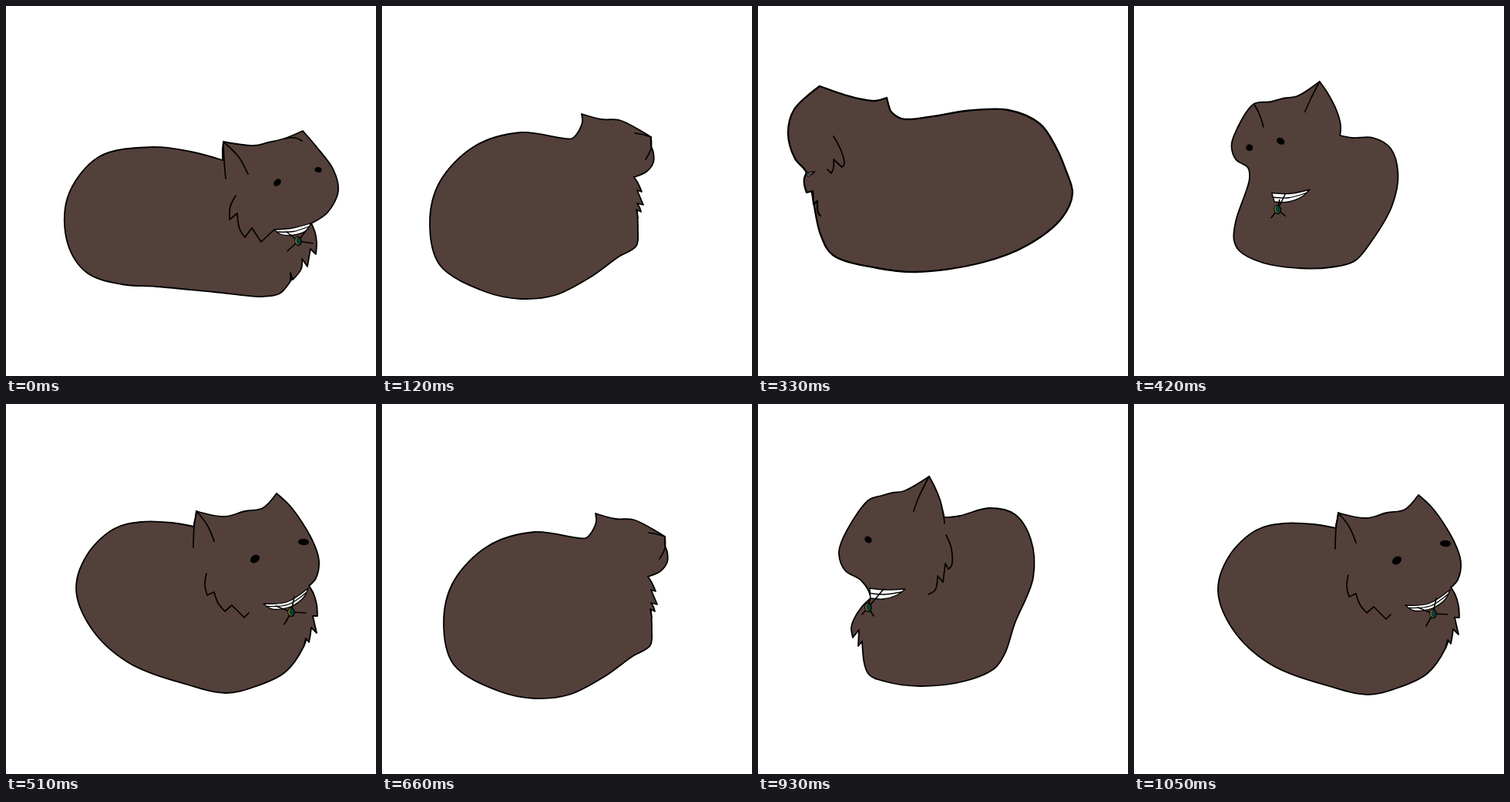
Write an HTML page with a canvas that moves like this. It is 480 by 480 pixels and loops after 1.08 s.

```html
<!DOCTYPE html>
<html lang="en">
<head>
<meta charset="utf-8">
<title>Turning cat</title>
<style>
  html, body { margin: 0; width: 100%; height: 100%; overflow: hidden; background: #fff; }
  canvas { display: block; }
</style>
</head>
<body>
<canvas id="stage" width="480" height="480"></canvas>
<script>
const ctx = document.getElementById("stage").getContext("2d");
const FUR = "#54403a", STEP = 30, POSES = 18;

const parse = s => s.split(" ").map(p => p.split(",").map(Number));
const shift = (pts, dx, dy) => pts.map(([x, y]) => [x + dx, y + dy]);
const mid = (a, b) => [(a[0] + b[0]) / 2, (a[1] + b[1]) / 2];

// A track holds point lists at some poses and the pose ranges in which it shows.
function track(ranges, keys) {
  const list = Object.entries(keys).map(([pose, pts]) =>
    [+pose, typeof pts === "string" ? parse(pts) : pts]);
  return pose => {
    if (!ranges.some(([a, b]) => pose >= a && pose <= b)) return null;
    const next = list.findIndex(k => k[0] >= pose);
    const [p1, b] = list[next];
    if (p1 === pose || next === 0) return b;
    const [p0, a] = list[next - 1], k = (pose - p0) / (p1 - p0);
    return a.map((pt, i) => pt.map((v, j) => v + (b[i][j] - v) * k));
  };
}

// Head clockwise from the left neck, then the body from the right neck.
const outline = track([[0, 17]], {
  0: "281,200 281,195 281,190 281,185 282,176 322,181 340,177 361,172 385,162 403,183 425,213 431,240 417,268 396,282 " +
     "398,300 385,328 369,357 355,373 333,377 270,371 195,364 150,361 105,346 80,308 80,248 120,196 190,183 240,189",
  4: "246,172 252,167 257,159 260,150 259,140 285,147 308,148 336,162 349,170 349,181 352,190 352,203 343,215 327,222 " +
     "330,245 331,265 332,290 330,311 306,326 270,352 225,375 180,380 135,371 75,336 62,280 75,228 120,182 180,164",
  11: "63,216 48,198 39,165 47,134 80,104 115,116 135,121 152,123 167,119 169,127 172,136 178,142 186,146 197,147 " +
      "235,142 270,136 325,135 366,153 387,184 399,212 408,243 395,274 350,310 290,333 205,345 155,340 97,323 81,296",
  13: "116,227 95,214 87,193 91,175 125,123 142,117 157,113 171,111 204,92 211,105 218,122 222,138 223,144 225,145 " +
      "244,143 282,133 315,141 336,174 339,223 315,283 303,320 290,340 252,357 192,364 147,358 126,349 118,320 128,248",
  17: "244,159 244,155 245,151 246,147 247,139 283,146 310,139 333,135 351,116 370,134 397,176 406,203 402,226 393,236 " +
      "401,255 395,285 386,315 362,348 322,367 285,375 235,364 158,335 110,290 91,240 105,196 140,162 175,153 215,154"
});

const chestRight = track([[0, 4], [17, 17]], {
  0: "396,282 401,294 403,307 402,322 395,315 391,338 384,328 383,341 372,355 369,346 369,357",
  4: "327,222 331,228 334,234 337,241 331,239 339,258 331,256 334,261 336,267 330,264 332,275",
  17: "393,236 399,246 403,260 404,275 398,275 403,297 396,290 395,298 393,309 389,304 386,315"
});
const chestLeft = track([[11, 13]], {
  11: "63,216 60,224 60,231 63,242 71,240 72,257 77,253 78,268 81,272",
  13: "128,250 116,262 106,278 103,288 105,301 113,291 112,312 117,306 118,320"
});

const cheekFront = parse("298,246 291,260 290,277 300,269 303,289 310,300 319,288 331,306 347,291");
const cheekTurned = parse("260,220 258,234 261,248 270,244 275,258 284,269 293,261 309,277 315,271");
const lines = [
  // cheeks
  track([[0, 2], [15, 17]], {
    0: cheekFront, 4: shift(cheekFront, 0, -40),
    13: shift(cheekTurned, -130, -5), 17: cheekTurned
  }),
  track([[11, 13]], {
    11: "98,169 108,188 112,205 109,209 98,199 98,210 95,217 92,214 90,212",
    13: "226,168 233,186 233,208 229,212 225,205 222,229 215,221 212,239 203,245"
  }),
  // ears
  track([[0, 2], [14, 17]], {
    0: "283,177 302,196 314,218", 4: "260,140 262,150 264,160",
    13: "125,123 130,135 134,150", 17: "247,139 261,157 270,178"
  }),
  track([[0, 3], [15, 17]], {
    0: "282,176 283,200 285,224", 4: "259,140 259,155 250,170",
    13: "125,123 122,135 120,150", 17: "247,139 244,160 243,186"
  }),
  track([[12, 15]], {
    11: "167,119 160,130 150,140", 13: "204,92 190,120 184,137", 17: "351,116 345,126 335,138"
  }),
  track([[12, 13]], { 11: "172,136 174,139 178,142", 13: "222,138 223,144 224,153" }),
  track([[0, 4]], { 0: "361,172 375,171 384,175", 4: "328,165 339,167 349,170" }),
  track([[4, 4]], { 4: "349,170 349,185 342,199" })
];

const scarf = track([[0, 2], [11, 17]], {
  0: "348,290 372,288 395,282 391,290 374,297 356,296",
  4: "322,222 325,223 328,222 328,224 326,225 323,224",
  11: "62,217 66,216 74,215 70,218 67,220 63,220",
  13: "127,237 147,239 173,238 162,246 144,251 128,250",
  17: "334,259 364,257 392,239 386,251 369,263 345,266"
});

// Pendant centre followed by the four cord ends.
const pendant = track([[0, 1], [12, 17]], {
  0: "379,305 365,318 398,308 364,293 392,288",
  4: "329,240 325,248 333,243 322,226 328,224",
  11: "62,226 58,232 66,233 70,217 63,219",
  13: "125,262 117,271 132,273 145,238 127,252",
  17: "370,270 361,286 389,271 350,262 374,250"
});

// Eye centre, radii, and tilt in degrees.
const eyes = [
  track([[0, 2], [14, 17]], {
    0: "352,229 5.5,4 -45,0", 4: "365,185 3,4 -45,0",
    13: "92,178 4,4 0,0", 17: "323,201 6.5,4.8 -35,0"
  }),
  track([[0, 0], [12, 17]], {
    0: "405,212.5 4.6,3.5 8,0", 11: "40,170 3,4 40,0",
    13: "125,174 5,4.2 42,0", 17: "386,179 7,4.2 3,0"
  })
];

// Smooth curve through points; sharp turns stay corners.
function trace(pts, closed) {
  const n = pts.length;
  const get = i => closed ? pts[(i + n) % n] : pts[Math.max(0, Math.min(n - 1, i))];
  const handles = pts.map((p, i) => {
    const a = get(i - 1), b = get(i + 1);
    const u = [p[0] - a[0], p[1] - a[1]], v = [b[0] - p[0], b[1] - p[1]];
    const lu = Math.hypot(...u), lv = Math.hypot(...v);
    if (!lu || !lv || (u[0] * v[0] + u[1] * v[1]) / (lu * lv) < 0.59) return [p, p];
    const s = Math.sqrt(lu), t = Math.sqrt(lv);
    const m = [0, 1].map(j => u[j] / s - (u[j] + v[j]) / (s + t) + v[j] / t);
    return [-s, t].map(k => [p[0] + m[0] * k / 3, p[1] + m[1] * k / 3]);
  });
  ctx.beginPath();
  ctx.moveTo(...pts[0]);
  for (let i = 0; i < (closed ? n : n - 1); i++) {
    const j = (i + 1) % n;
    ctx.bezierCurveTo(...handles[i][1], ...handles[j][0], ...pts[j]);
  }
  if (closed) ctx.closePath();
}

function shape(pts, fill) {
  trace(pts, true);
  ctx.fillStyle = fill;
  ctx.fill();
  ctx.stroke();
}

function line(pts) {
  trace(pts, false);
  ctx.stroke();
}

function oval(x, y, rx, ry, tilt, fill) {
  ctx.beginPath();
  ctx.ellipse(x, y, rx, ry, tilt, 0, 7);
  ctx.fillStyle = fill;
  ctx.fill();
}

function tuft(pts, inward) {
  if (!pts) return;
  const inner = shift([pts[pts.length - 1], pts[0]], inward, 0);
  ctx.beginPath();
  [...pts, ...inner].forEach(p => ctx.lineTo(...p));
  ctx.fillStyle = FUR;
  ctx.fill();
  line(pts);
}

function drawScarf(s) {
  ctx.lineWidth = 1.3;
  shape(s, "#fff");
  line([mid(s[0], s[5]), mid(s[1], s[4]), mid(s[2], s[3])]);
}

function drawPendant([c, ...ends]) {
  ctx.lineWidth = 1.6;
  ends.forEach(e => line([c, e]));
  oval(...c, 4.8, 6.2, -0.2, "#000");
  oval(c[0] - 0.5, c[1], 3.4, 4.8, -0.2, "#8a6d28");
  oval(c[0] + 0.6, c[1], 2.9, 4.3, -0.2, "#073f35");
}

function draw(pose, dx, dy) {
  ctx.setTransform(1, 0, 0, 1, 0, 0);
  ctx.fillStyle = "#fff";
  ctx.fillRect(0, 0, 480, 480);
  ctx.translate(dx, dy);
  ctx.strokeStyle = "#000";
  ctx.lineJoin = ctx.lineCap = "round";
  ctx.lineWidth = pose > 7 && pose < 13 ? 2.3 : 1.8;

  shape(outline(pose), FUR);
  tuft(chestRight(pose), -12);
  tuft(chestLeft(pose), 12);
  ctx.lineWidth = 1.7;
  lines.map(l => l(pose)).filter(Boolean).forEach(line);

  const s = scarf(pose), p = pendant(pose);
  if (s) drawScarf(s);
  if (p) drawPendant(p);
  for (const eye of eyes) {
    const e = eye(pose);
    if (e) oval(...e[0], ...e[1], e[2][0] * Math.PI / 180, "#000");
  }
}

const start = performance.now();
function tick() {
  const step = Math.floor((performance.now() - start) / STEP) % (2 * POSES);
  const second = step >= POSES;
  draw(step % POSES, second ? 18 : 0, second ? 2 : 0);
  requestAnimationFrame(tick);
}
tick();
</script>
</body>
</html>
```
